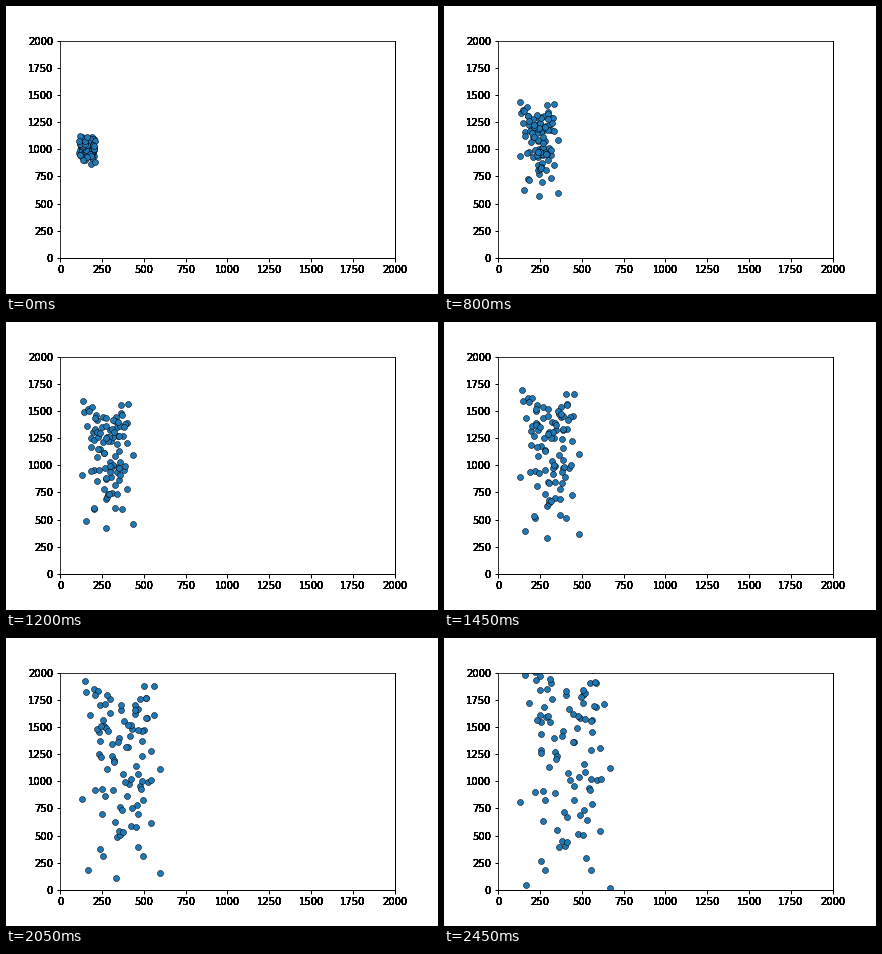
A matplotlib script that plays this animation: 432 px wide and 288 px high, repeating every 2.5 s.

```python
import matplotlib.pyplot as plt
import numpy as np
from matplotlib.animation import FuncAnimation

FRAMES, INTERVAL = 50, 50
SIZE, GRID = 2000, 250
CROWD = 88

# Outermost dots: start x, start y, speed x, speed y
RIM = np.array([
    (200, 899, 9.4, -17.6),
    (200, 1073, 9.4, 0.9),
    (118, 1104, 0.8, 19.5),
    (125, 1002, 0.75, 19.6),
    (130, 1008, 0, -4),
    (146, 922, 0.45, -17.5),
    (184, 887, 3.6, -18.5),
    (161, 1065, 9.5, 13),
])

plt.rcParams.update({"font.family": "DejaVu Sans", "font.size": 10})


def make_dots():
    """Return start and speed per step of every dot in data units."""
    rng = np.random.default_rng(4)
    starts = rng.uniform((108, 900), (200, 1100), (CROWD, 2))
    speed_x = rng.uniform(1, 9, CROWD)
    speed_y = -17 + 37 * rng.random(CROWD) ** 0.8   # slightly more go up
    crowd = np.column_stack([starts, speed_x, speed_y])
    rows = rng.permutation(np.vstack([RIM, crowd]))
    return rows[:, :2], rows[:, 2:]


def ink_labels(ax, times=9):
    """Print the tick labels again to harden their soft edges."""
    for value in range(0, SIZE + 1, GRID):
        for _ in range(times):
            ax.annotate(str(value), (value, 0), (0, -7),
                        textcoords="offset points", ha="center", va="top")
            ax.annotate(str(value), (0, value), (-7, 0),
                        textcoords="offset points", ha="right",
                        va="center_baseline")


fig = plt.figure(figsize=(6, 4), dpi=72, facecolor="white")
ax = fig.add_axes([0.125, 0.125, 0.775, 0.755])
ticks = range(0, SIZE + 1, GRID)
ax.set(xlim=(0, SIZE), ylim=(0, SIZE), xticks=ticks, yticks=ticks)
ax.tick_params(width=1)
for side in ("right", "bottom"):
    ax.spines[side].set_linewidth(1)
ink_labels(ax)

starts, speeds = make_dots()
dots, = ax.plot([], [], "o", ms=6, color="#1f77b4", mec="black", mew=0.5)


def update(i):
    dots.set_data(*(starts + speeds * (i + 1)).T)
    return dots,


anim = FuncAnimation(fig, update, frames=FRAMES, interval=INTERVAL,
                     repeat=True, repeat_delay=0, blit=False)
plt.show()
```
